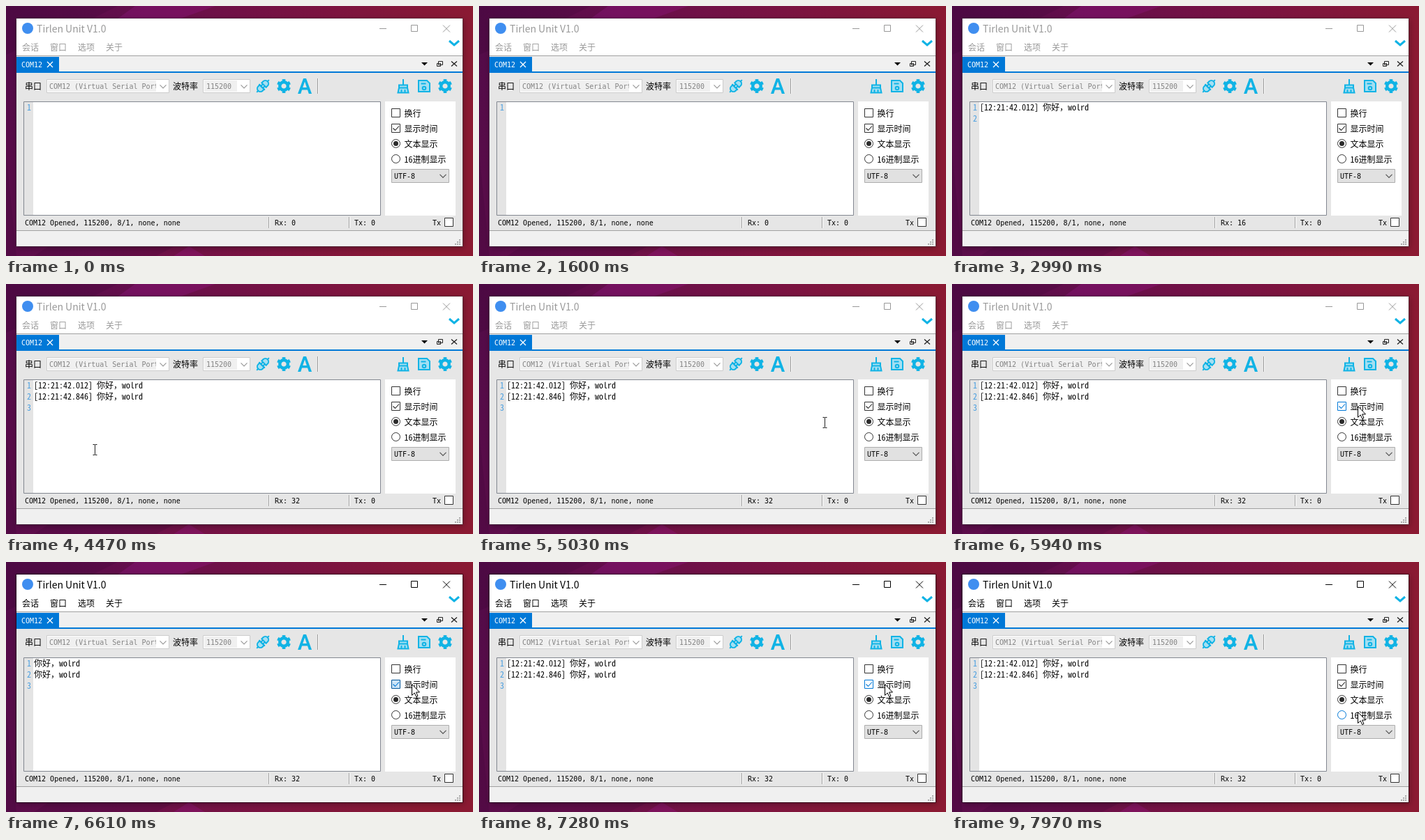
These frames come from a looping animation (669x359 px, 8000 ms). An HTML page:

```html
<!DOCTYPE html>
<html lang="zh">
<head>
<meta charset="utf-8">
<style>
  html, body { margin: 0; width: 100%; height: 100%; overflow: hidden; background: #640f45; }
  svg { display: block; width: 669px; height: 359px; }
  text { font: 12px "Noto Sans Mono CJK SC", "Noto Sans CJK SC", "Noto Sans CJK", monospace; white-space: pre; }
  .ui { font-family: "Noto Sans CJK SC", "Noto Sans CJK", sans-serif; }
  .title { font-size: 14px; }
  .latin { font: 10px "DejaVu Sans Mono", monospace; }
  .number { fill: #4a9fe0; }
  .line { fill: none; stroke: #222; }
  .thin { fill: none; stroke: #555; stroke-width: 1.2; }
  .cyan { fill: none; stroke: #10b3e5; stroke-width: 2; }
  .pale { fill: #a3dff2; }
  .fill { fill: #10b3e5; }
  .caption { fill: #999; stroke: #999; }
  .active .caption { fill: #000; stroke: #000; }
  text.caption, .active text.caption { stroke: none; }
  .caption.icon, .active .caption.icon { fill: none; }
  .frame { fill: none; stroke: #444; opacity: .45; }
  .active .frame { stroke: #000; }
  .box { fill: #fff; stroke: #333; }
  .mark { fill: none; stroke: #222; stroke-width: 1.1; }
  .dot { fill: #2b2b2b; }
  .hover .box { stroke: #0078d7; }
  .hover .mark { stroke: #0078d7; }
  .hover .dot { fill: #2a7dc4; }
  .pressed .box { fill: #cce4f7; stroke: #005499; }
</style>
</head>
<body>
<svg viewBox="0 0 669 359">
  <defs>
    <linearGradient id="wall" x2="1" y2=".12">
      <stop stop-color="#520b48"/><stop offset=".3" stop-color="#660e4c"/>
      <stop offset=".65" stop-color="#7a1341"/><stop offset="1" stop-color="#8b1a32"/>
    </linearGradient>
    <filter id="shadow" x="-5%" y="-5%" width="110%" height="115%">
      <feDropShadow dx="1" dy="2" stdDeviation="4" flood-opacity=".35"/>
    </filter>
    <clipPath id="portClip"><path d="M59 106h156v18h-156z"/></clipPath>
    <g id="gear">
      <circle class="cyan" r="5.8" style="stroke-width:4.4"/>
      <circle class="cyan" r="8.6" pathLength="12" stroke-dasharray="1 1" stroke-dashoffset="-.5" style="stroke-width:3"/>
    </g>
    <path id="down" class="thin" d="M-4.500 -2.200L0 2.300L4.500 -2.200"/>
  </defs>

  <path fill="url(#wall)" d="M0 0h669v359h-669z"/>
  <path fill="#300030" opacity=".16" d="M0 0H160L120 20L0 70zM0 210L15 359H0zM60 346H240L215 359H40z"/>
  <path fill="#a01a98" opacity=".25" d="M185 0H300L250 18H160zM262 345L285 359H240z"/>

  <g id="window">
    <path fill="#f0f0f0" filter="url(#shadow)" d="M15 18h639v327h-639z"/>
    <path class="frame" d="M14.500 17.500h640v328h-640z"/>
    <path fill="#fff" d="M15 18h639v53h-639z"/>
    <circle cx="31" cy="32" r="8" fill="#3f8ef0"/>
    <text class="ui title caption" x="44" y="37.5">Tirlen Unit V1.0</text>
    <path class="caption icon" d="M535 32.5h10M580.5 27.5h9v9h-9zM626 27.5l10 10M636 27.5l-10 10"/>
    <g id="menu"></g>
    <path class="cyan" style="stroke-width:3" d="M635 50l7 6l7 -6"/>

    <path stroke="#a0a0a0" d="M15 71.5h639"/>
    <path fill="#0078d7" d="M15 73h61v21h-61zM15 94h639v2h-639z"/>
    <path stroke="#fff" stroke-width="1.3" d="M59 80l8 8M67 80l-8 8"/>
    <path d="M595 81h9l-4.5 4.5z"/>
    <path class="line" d="M619.500 79.500h6v5h-6zM617.500 82.500h5v4h-5z"/>
    <path class="line" stroke-width="1.3" d="M638 79.500l8 7M646 79.500l-8 7"/>

    <path fill="#e6e6e6" d="M15 96h639v226h-639z"/>
    <g stroke="#ccc">
      <path fill="#fff" d="M58.500 105.500h175v19h-175zM282.500 105.500h67v19h-67z"/>
      <path fill="#f0f0f0" stroke="none" d="M60 107h155v16h-155zM284 107h47v16h-47z"/>
    </g>
    <use href="#down" x="225" y="115.500" opacity=".6"/>
    <use href="#down" x="341" y="115.500" opacity=".6"/>

    <g transform="translate(368 115) rotate(45)">
      <path class="cyan pale" d="M-4.500 -2h9v-3a4.500 4.500 0 0 0 -9 0zM-4.500 2h9v3a4.500 4.500 0 0 1 -9 0z"/>
      <path class="cyan" d="M-6 2h12M0 -9.500v-3M0 9.500v3M-2 -2v4M2 -2v4"/>
    </g>
    <use href="#gear" x="398" y="115"/>
    <path class="fill" fill-rule="evenodd" d="M418 126L426 104H430L438 126H433.800L432 120.500H424L422.200 126zM425.200 117H430.800L428 108.500z"/>
    <path stroke="#999" d="M446.500 104v22"/><path stroke="#fff" d="M447.500 104v22"/>
    <path class="cyan pale" d="M569 105v8M563 113.500h12v4h-12zM563 117.500l-1.500 7h15l-1.500 -7M566.500 124v-4M571.500 124v-4"/>
    <path class="cyan pale" d="M591 107h12l4 4v12h-16zM594.500 111.500h7"/>
    <circle class="cyan" cx="599" cy="118" r="2.300"/>
    <use href="#gear" x="629" y="115"/>

    <path fill="#fff" stroke="#828790" d="M25.500 137.500h511v163h-511z"/>
    <path fill="#e4e4e4" d="M26 138h13v162h-13z"/>
    <path fill="#fff" d="M543 137h101v164h-101z"/>
    <path fill="#e1e1e1" stroke="#adadad" d="M552.500 234.500h82v19h-82z"/>
    <use href="#down" x="626" y="244"/>

    <path stroke="#a0a0a0" d="M376.500 303v16M491.500 303v16M15 322.500h639"/>
    <path stroke="#fff" d="M377.500 303v16M492.500 303v16"/>
    <path class="box" d="M628.500 304.500h12v12h-12z"/>
    <path stroke="#aaa" stroke-width="2" stroke-dasharray="2 1" d="M649 336h2M646 339h5M643 342h8"/>

    <path class="box" d="M552.500 147.500h12v12h-12z"/>
    <g id="timeBox">
      <path class="box" d="M552.500 169.500h12v12h-12z"/>
      <path class="mark" d="M554.500 175.500l3 3l5.500 -6"/>
    </g>
    <g id="textRadio">
      <circle class="box" cx="558.500" cy="197.500" r="6"/><circle class="dot" cx="558.500" cy="197.500" r="3.500"/>
    </g>
    <g id="hexRadio"><circle class="box" cx="558.500" cy="219.500" r="6"/></g>
    <g id="labels"></g>
    <g id="editor"></g>
  </g>

  <path id="beam" class="line" d="M-3 -7.500h2.500l.5 .5l.5 -.5h2.500M0 -7v14M-3 7.500h2.500l.5 -.5l.5 .5h2.500"/>
  <path id="arrow" fill="#fff" stroke="#000" d="M.5 .5V16.500L4.200 13L6.700 18.500L9 17.500L6.600 12H11.500z"/>
</svg>
<script>
const $ = id => document.getElementById(id);
const LOOP = 8000, STEP = 70;

// Adds text vertically centred on cy.
function addText(parent, x, cy, content, attrs = {}) {
  const el = document.createElementNS('http://www.w3.org/2000/svg', 'text');
  Object.entries({ x, y: cy + 4.5, ...attrs }).forEach(([key, value]) => el.setAttribute(key, value));
  el.textContent = content;
  return parent.appendChild(el);
}

['会话', '窗口', '选项', '关于'].forEach((name, i) =>
  addText($('menu'), 23 + 40 * i, 59, name, { class: 'ui caption' }));

const addLabel = (x, cy, content, attrs) => addText($('labels'), x, cy, content, attrs);
const addLatin = (x, cy, content, attrs) => addLabel(x, cy - .5, content, { class: 'latin', ...attrs });

addLatin(22, 83.5, 'COM12', { fill: '#fff' });
addLabel(27, 115, '串口');
addLatin(62, 115, 'COM12 (Virtual Serial Port)', { fill: '#838383', 'clip-path': 'url(#portClip)' });
addLabel(239, 115, '波特率');
addLatin(287, 115, '115200', { fill: '#838383' });
['换行', '显示时间', '文本显示', '16进制显示'].forEach((name, i) =>
  addLabel(570.5, 154.5 + 22 * i, name));
addLatin(556, 244, 'UTF-8');
addLatin(27, 311, 'COM12 Opened, 115200, 8/1, none, none');
const received = addLatin(385, 311, '');
addLatin(499, 311, 'Tx: 0');
addLatin(611, 311, 'Tx');

const stamps = ['12:21:42.012', '12:21:42.846'];
const numbers = [1, 2, 3].map((n, i) => addText($('editor'), 30, 145.5 + 16 * i, n, { class: 'number' }));
const lines = stamps.map((_, i) => addText($('editor'), 40, 145.5 + 16 * i, ''));

// Pointer waypoints: time, x, y
const visits = [
  [[1390, 10, 337], [1460, 254, 318], [1530, 60, 292], [1600, 60, 292]],
  [[4470, 127, 238], [5240, 572, 191], [5380, 586, 190], [5520, 593, 188],
   [5660, 590, 182], [5940, 581, 175], [7280, 581, 175], [7900, 581, 215], [LOOP, 581, 215]],
];

function pointerAt(time) {
  const t = 4470 + Math.floor((time - 4470) / STEP) * STEP;
  const path = visits.find(p => t >= p[0][0] && t < p[p.length - 1][0]);
  if (!path) return null;
  const i = path.findIndex(p => p[0] > t);
  const [t0, x0, y0] = path[i - 1], [t1, x1, y1] = path[i];
  const k = (1 - Math.cos(Math.PI * (t - t0) / (t1 - t0))) / 2;
  return { x: Math.round(x0 + (x1 - x0) * k), y: Math.round(y0 + (y1 - y0) * k) };
}

const within = (t, from, to) => t >= from && t < to;
const show = (el, visible) => el.style.display = visible ? '' : 'none';

function render(t) {
  const rows = (t >= 2990) + (t >= 3790);
  const stamped = !within(t, 6610, 7210);
  received.textContent = 'Rx: ' + rows * 16;
  numbers.forEach((el, i) => show(el, i <= rows));
  lines.forEach((el, i) => {
    el.textContent = i < rows ? (stamped ? `[${stamps[i]}] ` : '') + '你好，wolrd' : '';
  });
  $('window').classList.toggle('active', t >= 6470);

  const pointer = pointerAt(t);
  const inEditor = pointer && pointer.x < 537 && pointer.y < 300;
  show($('beam'), inEditor);
  show($('arrow'), pointer && !inEditor);
  if (pointer) {
    const shift = inEditor ? 0.5 : 0;
    $(inEditor ? 'beam' : 'arrow').setAttribute('transform', `translate(${pointer.x + shift} ${pointer.y})`);
  }

  // Hover highlights trail the pointer by one step.
  const past = pointerAt(t - STEP);
  const hover = (id, top, bottom) =>
    $(id).classList.toggle('hover', !!past && past.x > 550 && within(past.y, top, bottom));
  hover('timeBox', 166, 187);
  hover('textRadio', 187, 209);
  hover('hexRadio', 209, 231);
  $('timeBox').classList.toggle('pressed', within(t, 6470, 6680) || within(t, 7140, 7280));
  show($('timeBox').querySelector('.mark'), !within(t, 6680, 7210));
}

const start = performance.now();
function tick() {
  render((performance.now() - start) % LOOP);
  requestAnimationFrame(tick);
}
tick();
</script>
</body>
</html>
```
